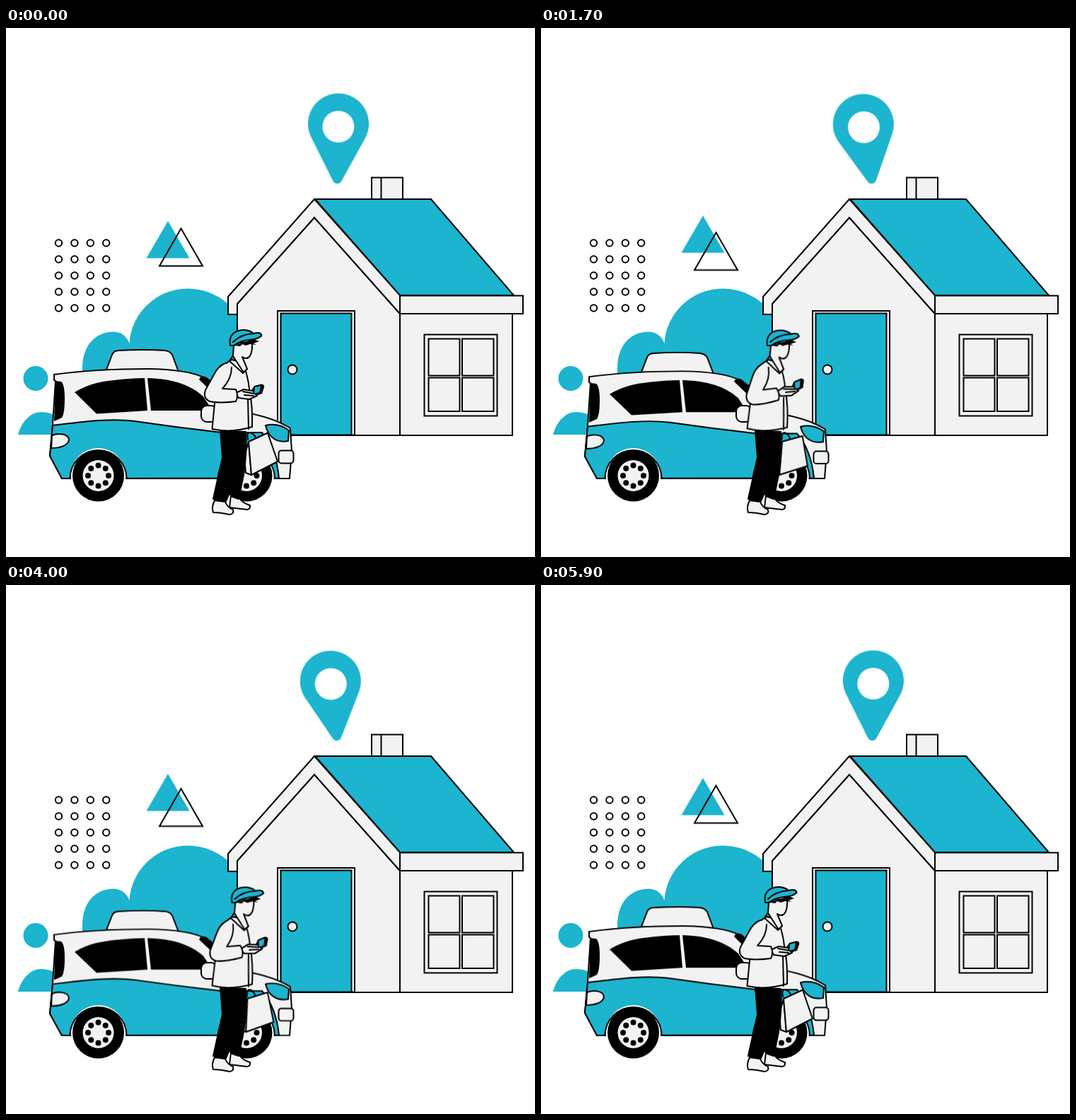
Animation of 748x748 px, one loop 6000 ms. Source, as an HTML page:

```html
<!DOCTYPE html>
<html lang="en">
<head>
<meta charset="utf-8">
<title>Ride home</title>
<style>
  html, body { margin: 0; width: 100%; height: 100%; overflow: hidden; background: #fff; }
  svg { display: block; width: 100vw; height: 100vh; }
  .line { stroke: #000; stroke-width: 2; stroke-linejoin: round; stroke-linecap: round; }
  .sharp { stroke-linejoin: miter; }
  .teal { fill: #1cb4ce; }
  .gray { fill: #f2f2f2; }
  .none { fill: none; }

  .sway { animation: 1.5s cubic-bezier(.37, 0, .63, 1) infinite alternate; }
  .pin { transform-origin: 468px 219px; animation-name: pin; }
  .up { animation-name: up; }
  .down { animation-name: down; }
  .lean { transform-origin: 318px 568px; animation-name: lean; }
  .arm { transform-origin: 318px 478px; animation-name: arm; }
  .bag { transform-origin: 343px 573px; animation-name: bag; }
  .body { transform-origin: 232px 637px; animation: body 3s ease-in-out infinite; }

  @keyframes pin { from { transform: rotate(1.4deg); } to { transform: rotate(-8.8deg); } }
  @keyframes up { to { transform: translateY(-8px); } }
  @keyframes down { to { transform: translateY(6px); } }
  @keyframes lean { to { transform: rotate(1.5deg); } }
  @keyframes arm { to { transform: rotate(-12deg); } }
  @keyframes bag { to { transform: rotate(10deg); } }
  @keyframes body {
    0%, 100% { transform: scaleY(1); }
    33.33% { transform: scaleY(.97); }
    60% { transform: scaleY(.979); }
    76.67% { transform: scaleY(.978); }
  }
</style>
</head>
<body>
<svg viewBox="0 0 748 748">
  <defs>
    <g id="wheel">
      <circle r="39" fill="#fff"/>
      <path class="line none" d="M-40 4A40 40 0 0 1 40 4"/>
      <circle r="36.5"/>
      <circle class="gray" r="22"/>
      <g id="bolts"></g>
    </g>
  </defs>

  <!-- scenery -->
  <g class="teal">
    <path d="M108 560V482C108 450 125 429.500 153 429.500C163 430 171 436 174.500 446C177 403 213 368.500 257 368.500C285 368.500 311 382 327 405V560Z"/>
    <circle cx="42" cy="495.500" r="17.500"/>
    <path d="M17 575C22 556 35 543 50 543C58 543 65 545 72 549V575Z"/>
  </g>
  <g id="dots" class="line none"></g>
  <path class="teal sway up" d="M229 273L259.500 325.500H198.500Z"/>
  <path class="line none sharp sway down" d="M247.500 283.500L278 336.500H217Z"/>

  <path class="teal sway pin" fill-rule="evenodd" d="M461.500 215L429 153.500A43 43 0 1 1 507 153.500L475 215Q473 220 468 220Q464 220 461.500 215ZM468 117A22.500 22.500 0 1 0 468 162A22.500 22.500 0 1 0 468 117Z"/>

  <!-- house -->
  <g class="line gray sharp">
    <path d="M517 211.500H561V242H517ZM530.500 211.500V242"/>
    <path d="M557 404H716V576H557Z"/>
    <path d="M327 390L436 268L557 404V576H327Z"/>
    <path d="M436 242L314 380V405H327V390L436 268L557 404V378Z"/>
    <path class="teal" d="M437 242H601L718 378H557Z"/>
    <path d="M557 378.500H731V404H557Z"/>
    <path d="M384 400H493V575.500H384Z"/>
    <path class="teal" d="M388.500 403.500H488.500V575.500H388.500Z"/>
    <circle cx="405" cy="483" r="6.500"/>
    <path d="M591.500 433.500H694.500V548.500H591.500Z"/>
    <path d="M597.500 439.500H641.500V491.500H597.500ZM645 439.500H689.500V491.500H645ZM597.500 494.500H641.500V542H597.500ZM645 494.500H689.500V542H645Z"/>
  </g>

  <!-- car -->
  <g class="body">
    <path class="line gray" d="M142 483L150 462Q152 456.500 159 456C185 454.500 205 454.500 225 456Q232 457 235 462L244 486Z"/>
    <path class="line gray" d="M68 490C105 485 150 482 200 482C240 482.500 266 487 281 495C305 509 325 527 345 545C370 550 388 557 402 566L404 598L401 637H79L62 605L66 560L70 499L68 498Z"/>
    <path class="line teal" d="M66 562C100 558 145 551 182 556C230 563 270 568 305 572H362Q382 596 386 636.500L79 637L62 605Z"/>
    <path d="M70 499L78 500Q83 504 83 524Q83 545 79 551L68 556Z"/>
    <path d="M97 515Q112 506 128 502Q155 496 196 495L200 541L128 545.500Z"/>
    <path d="M200 495C235 496 260 504 279 521L292 541H205Z"/>
    <path d="M273 497Q276 490 284 494L330 535L318 541Z"/>
    <path class="line gray" d="M65 576C75 572 88 574 89 582C88 591 75 594 64 594Z"/>
    <path class="line teal" d="M367 562C380 559 392 563 400 569L399 584C383 587 371 579 367 562Z"/>
    <rect class="line gray" x="385.500" y="597.500" width="21" height="18" rx="4"/>
  </g>
  <use href="#wheel" x="130.500" y="633"/>
  <use href="#wheel" x="340" y="633"/>

  <!-- rider -->
  <g class="sway bag">
    <path class="line none" d="M342 582Q340 571 345 572Q351 574 353 579"/>
    <path class="line gray" d="M343 585L337 606L339 629L347 632Z"/>
    <path class="line gray" d="M343 585L370 572.500L384 613L347 632Z"/>
  </g>
  <path class="line gray" d="M295 668L310 670Q313 678 321 681Q323 687 316 688Q303 685 293 685Q290 678 295 668Z"/>
  <path class="line gray" d="M318 661L330 665Q335 672 345 675Q346 680 341 681L316 678Z"/>
  <path class="line" d="M303 569L339 571Q341 601 336 632L329 666L318 662L320 648L311 669L293 666L306 607Z"/>
  <rect class="line gray" x="276" y="534" width="22" height="23" rx="8"/>

  <g class="sway lean">
    <path class="line gray" d="M319 469Q303 477 298 500L291.500 567Q318 573 348 564Q349 535 344 510Q342 492 335 473Z"/>
    <path class="line none" d="M342 522L343 567"/>

    <path class="line gray" d="M322 449L321 464L336 487L341 482L334 465C343 471 349 463 348 444L330 445Z"/>
    <path class="line none" d="M321 463L316 471L335 488L341 482"/>
    <path d="M323 449L350 440L358 443L350 446L354 448L345 447L339 449L334 447L331 450Z"/>
    <path class="line teal" d="M317 449C314 433 325 426.500 338 427Q346 428 350 432Q360 429 361.500 435Q357 440 344 441Q332 442 322 449Z"/>
    <path class="line none" d="M321 444Q332 433 350 432"/>

    <g class="sway arm">
      <path class="line gray" d="M325 516L336 511L348 513L355 512L355 520L344 525L329 523Z"/>
      <path d="M347 512L351 506L361 503.500Q366 504 365 508L362 517L353 520Z"/>
      <path class="teal" d="M352 508L360 506L358 515L351 517Z"/>
      <path class="line none" d="M335 514L351 517M337 519L350 520"/>
      <path class="line gray" d="M310 474Q300 478 294 490L282 512Q278 523 288 528Q302 531 325 528Q329 520 325 511L306 510Q319 496 319 480"/>
    </g>
  </g>
</svg>
<script>
  const add = (id, x, y, r) => {
    const c = document.createElementNS("http://www.w3.org/2000/svg", "circle");
    Object.entries({ cx: x, cy: y, r }).forEach(([k, v]) => c.setAttribute(k, v));
    document.getElementById(id).append(c);
  };
  for (let i = 0; i < 20; i++) add("dots", 74.5 + (i % 4) * 22.4, 304 + Math.floor(i / 4) * 23, 4.7);
  for (let i = 0; i < 8; i++) {
    const a = i * Math.PI / 4;
    add("bolts", 14.5 * Math.cos(a), 14.5 * Math.sin(a), 4);
  }
</script>
</body>
</html>
```
